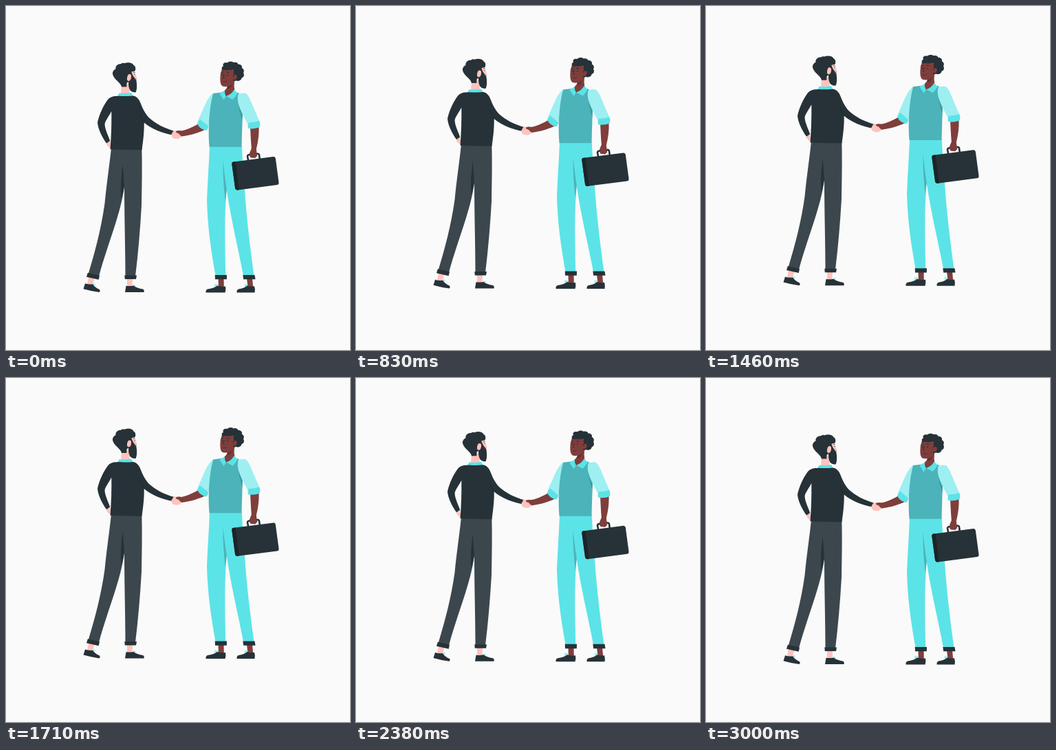
These frames come from a looping animation (500 by 500 pixels, 3.04 s). An HTML page:

```html
<!DOCTYPE html>
<html lang="en">
<head>
<meta charset="utf-8">
<title>Handshake</title>
<style>
html, body { margin: 0; height: 100%; overflow: hidden; background: #fafafa; }
svg { display: block; width: 100%; height: 100%; }
.dark { fill: #263238; }
.grey { fill: #3c474d; }
.pink { fill: #ffc3bd; }
.brown { fill: #7f3e3b; }
.shade { fill: #632f2d; }
.cyan { fill: #5ce3e7; }
.vest { fill: #4bb3b9; }
.sleeve { fill: #9eeff2; }
.line { fill: none; stroke: #263238; stroke-linecap: round; stroke-linejoin: round; }
</style>
</head>
<body>
<svg viewBox="0 0 500 500">
<g id="scene">
  <!-- bearded man -->
  <g>
    <path class="pink" d="M146 197L151 195L152.500 207.500Q148 205 146 201Z"/>
    <path class="pink" d="M120 394L128.500 396L125.500 406L118 404Z"/>
    <path class="pink" d="M176 396H184L183.500 408H176Z"/>
    <path class="sleeve" d="M125 404.500L128.500 402.500L130 405L127.500 407ZM183.500 406.500L187 404.500L189 407L186 408.500Z"/>
    <path class="dark" d="M115 403.200Q120 405 126 404.300Q129 409 136 412.200Q137.600 414 135.500 416Q124 414.500 112.500 411.200Z"/>
    <path class="dark" d="M174.500 406.800Q180 407.500 185.500 406.500Q190 410 199 411.500Q201.500 413 200.500 416H173Z"/>
    <path class="grey" d="M153 206H197.300C198 235 197.500 260 197 290C195 325 192 360 188 393H173.500C173.500 350 172 310 172 262C167 302 149 342 135 393L119.500 390C130 355 138 325 143.500 287C146 260 150 235 153 206Z"/>
    <path class="dark" d="M169.700 230.500C167.500 248 166 266 167.300 280Q170.500 271 172 262Z"/>
    <path class="dark" d="M118.800 387.800L136 391.800L134.700 397.800L117 393.800ZM172.300 391.500H190L189 397H172.800Z"/>

    <path class="pink" d="M168 112L167 129H180L179 114Z"/>
    <path class="cyan" d="M164.500 126.500Q173 128 182 126L185 131.500H162Z"/>
    <path class="dark" d="M163 130.700Q174 131.500 184 130.500C190 131 193.500 135.500 195.500 141C199 150 203 157.500 208 162.500C217 171 231 178 245 181.700L242.500 187.600C228 185 212 179 200.700 169.500C201 185 199 198 197.500 209.300Q174 209.300 151.500 208.300C153 190 153.500 172 153.300 153C149 161 144 167 143.500 172C144 180 149 189 151.200 196L146 199.500C140 191 133.500 179 133 169C136 156 142 144 148 136C152 131.500 157 131 163 130.700Z"/>
    <path d="M200.500 169.500C198 165 195.500 161 194.500 156" fill="none" stroke="#1c262b" stroke-width=".7"/>

    <path class="pink" d="M177 96L186 93L188.500 99L190.300 105.500L187 109L178 112Z"/>
    <path class="dark" d="M168 117.500C167 111 156.500 107 155 99C154.700 95 157 92.500 159.500 91.500C158.500 87.500 162.500 84 167.500 84C169.500 82.500 171 82.700 172 83.300C178 81 184 82.500 185.500 86C188.500 87.500 189 91.500 187.500 94.500L182.500 95.500C183 100 186.500 104 189.300 107.500C190.500 114 190.700 121 188.500 125.500Q183 126 180 122C178 118 178 114 178 110L175.500 112L175.300 117.500Z"/>
    <ellipse class="pink" cx="179" cy="104" rx="2.900" ry="5" transform="rotate(12 179 104)"/>
    <path d="M187 105.800L189.600 105L189.200 107.500Z" fill="#e96360"/>
    <path class="line" d="M185.300 96.300L187.300 96.500" stroke-width=".7"/>
    <circle class="dark" cx="186.900" cy="99.300" r=".6"/>
  </g>

  <!-- man with the briefcase -->
  <g>
    <path class="brown" d="M308.500 396H316.500L316.800 409H308.800ZM350 396H358L359.200 409H351.500Z"/>
    <path class="sleeve" d="M308.500 405L304 403.500L302 407L306.500 409ZM351.500 405L347.500 403.500L346 407L350 409Z"/>
    <path class="dark" d="M319 407.500Q313.500 408.500 307 406.500Q302 410.500 293 411.500Q290 412.500 290.500 416.500H318.500Q320 412 319 407.500ZM361 407.300Q356 408.500 350.500 406.500Q346 410.500 338 411.500Q335 412.500 335.500 416.500H361.500Q362.500 412 361 407.300Z"/>
    <path class="cyan" d="M296 203H342.700C344 228 345.500 248 347 268C350 312 355 352 360.500 392H345C337 350 327 310 320.700 267C317 308 318.500 350 319.200 392H304.500C298 355 293 322 292 282C293 255 295 230 296 203Z"/>
    <path class="vest" d="M315.500 224C315.300 245 316.500 265 318.800 284L320.700 266Q317 243 315.500 224Z"/>
    <path class="dark" d="M303.700 391H321L320.800 397.300H304ZM344.300 391H361.500L362.500 397.300H345.200Z"/>

    <path class="sleeve" d="M301 127C294 132 290 142 286 151L278.500 168L291.500 181L296 169Z"/>
    <path class="brown" d="M281.500 170.500C272 175.500 262 180.500 251 182.500L250 190C264 189 277 185.500 290 179.500Z"/>
    <path class="cyan" d="M282 164.500L294 174.500Q294 179 290.500 181Q280 178 278 170.500Z"/>
    <path class="brown" d="M355 176H367.500C368 188 366 199 363.800 208L365 218L362 221L355 220L354 214L356.800 207C356 197 355.500 187 355 176Z"/>

    <path class="vest" d="M301 127Q318 124 338 126L345 140C343.500 162 343 184 342.500 204.800H295.500C293.500 180 295 150 301 127Z"/>
    <path d="M338 138Q340 152 343.500 158L343.200 166Q338 152 338 138Z" fill="#409ba0"/>
    <path class="sleeve" d="M337.500 128Q343 125.500 349 127C353 131 355 136 357 141L369 169L352 173C346 161 340 151 337.500 141C336.500 136 336.500 132 337.500 128Z"/>
    <path class="cyan" d="M353 169.300Q361 169.500 368 166.800Q370.500 171.500 368.500 176.300Q361 179.300 352.300 178Q350.500 173.500 353 169.300Z"/>

    <path class="brown" d="M322 113Q322.500 119 317.500 123L318 131Q325 133 332.500 124Q331 117 332 108Z"/>
    <path class="shade" d="M322 116.500Q327 116 330 112Q328 119 322 121Z"/>
    <path class="cyan" d="M314.500 124.500L318 122.700Q317.500 128 320 131L316.500 136.500L310.500 127.500ZM331.500 121.500L334.500 124.500L336.500 127Q333 133 329.500 136L320 131Q328 128.500 331.500 121.500Z"/>
    <path class="brown" d="M314 91Q311 98 311.300 105C311.300 111 312 115.500 315.500 116.800C323 118.500 330 115 332.500 109L338 99L333 88Z"/>
    <path class="dark" d="M315.500 93.500C313 92 313 88 316 87.500C314 83.500 318 81.500 321.500 82.500C324 80 329 80.300 330.500 82C334 81 337 82.500 337.500 84.700C341 84.200 344 87 342.800 90C346 91.500 346.500 95 345 97C347 100 345.500 104 342.800 104.300C342 108 338 110 335 108.500L330.500 109L329.700 101.500C331.500 99.500 331.500 97.500 330.500 96C331.500 94 331.500 93 330 91.800C325 94.500 320 92 315.500 93.500Z"/>
    <ellipse class="brown" cx="332.800" cy="103.500" rx="2.800" ry="3.800" transform="rotate(20 332.800 103.500)"/>
    <path class="line" d="M313.500 97L316 96M320.500 96L324 96.800" stroke-width="1"/>
    <path class="line" d="M317.500 99L315.300 104.500L317.500 105" stroke-width=".8"/>
    <circle class="dark" cx="315" cy="100" r=".9"/>
    <circle class="dark" cx="321.800" cy="100.500" r=".9"/>
    <path class="line" d="M315.500 110Q318 111 320.500 109.500" stroke-width=".7"/>

    <path class="line" d="M352 224L351 218.500Q351 216.700 353 216.300L365.500 214.700Q367.500 214.500 368 216.500L368.700 222" stroke-width="2.600"/>
    <path class="brown" d="M356 210L363.500 209L365 217.500Q363.500 220.500 357 220.500L354.500 218.500Q354 214 356 210Z"/>
    <path class="dark" d="M331 226.400L388.500 219Q391.300 218.700 391.800 221.500L396.500 256.500Q396.800 259.500 394 260L337 267.400Q333.700 267.800 333 264.500L328.300 229.500Q328 226.800 331 226.400Z"/>
    <path d="M331 226.400L333.500 226.100L338.700 267.200L337 267.400Q333.700 267.800 333 264.500L328.300 229.500Q328 226.800 331 226.400Z" fill="#1b2428"/>
  </g>

  <!-- clasped hands -->
  <path class="pink" d="M243.500 181L250 181.200L255.500 186.500Q255.800 191 251 192.800Q246 194 242 191.500L240 187.300Z"/>
  <path class="brown" d="M256 181.500Q250 180.300 246.800 182.300Q247.300 185 250.500 185L253.800 188.500L256.500 189.500Z"/>
</g>
</svg>
<script>
const scene = document.getElementById('scene');
const LOOP = 3040, FPS = 24, HALF = 36, LIFT = 10;

// Linear rise and fall, stepped at 24 pictures a second
function draw() {
  const time = performance.now() % LOOP;
  const step = Math.min(2 * HALF, Math.floor((time + 5) * FPS / 1000));
  const lift = LIFT * (1 - Math.abs(1 - step / HALF));
  scene.setAttribute('transform', `translate(0 ${-lift})`);
  requestAnimationFrame(draw);
}
draw();
</script>
</body>
</html>
```
